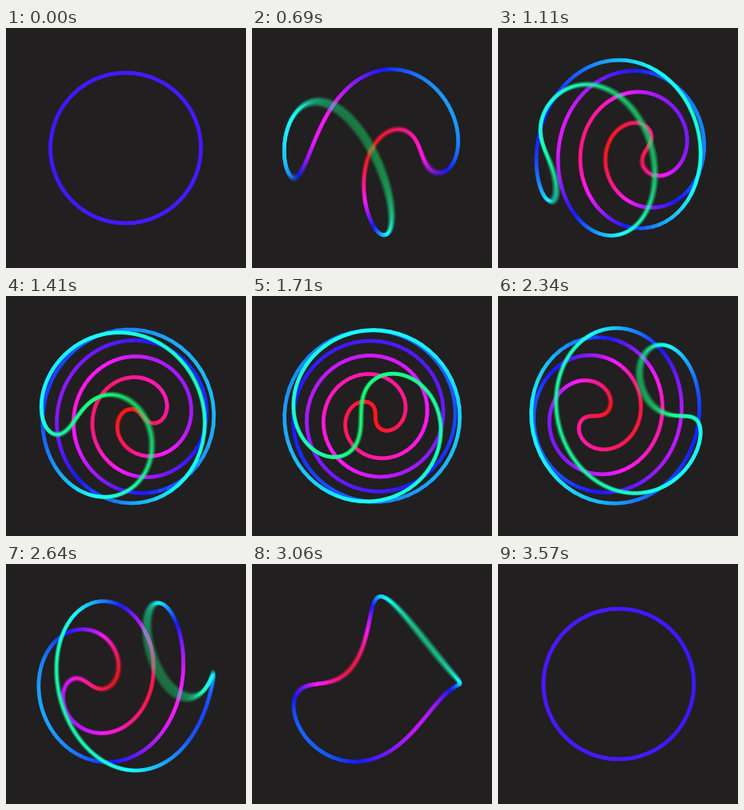
Animation, 300 px wide and 300 px high, one loop 3600 ms. Source, as an HTML page with a canvas:

```html
<!DOCTYPE html>
<html lang="en">
<head>
<meta charset="utf-8">
<title>Twisting ring</title>
<style>
  html, body { margin: 0; width: 100%; height: 100%; overflow: hidden; background: #221f20; }
  canvas { display: block; width: 300px; height: 300px; }
</style>
</head>
<body>
<canvas id="stage" width="300" height="300"></canvas>
<script>
const SIZE = 300, MID = SIZE / 2;
const STEP = 30, STEPS = 120;        // ms per step, steps per loop
const RADIUS = 94, CAMERA = 181;
const TWIST = 3 * Math.PI, POWER = 2.2;
const POINTS = 480, LINE = 4.7;
const SAMPLES = 10, SHUTTER = 0.7;   // motion blur

const stage = document.getElementById('stage').getContext('2d');
const layer = document.createElement('canvas');
layer.width = layer.height = SIZE;
const pen = layer.getContext('2d');
pen.lineWidth = LINE;
pen.lineCap = 'round';

const ease = p => p < 0.5
  ? 0.5 * (2 * p) ** POWER
  : 1 - 0.5 * (2 - 2 * p) ** POWER;

// A great circle twisted around its own axis, which turns half a revolution per loop.
function ringPoint(phi, turn, twist) {
  const along = Math.cos(phi), out = Math.sin(phi);
  const up = out * Math.cos(twist * along);
  const side = -out * Math.sin(twist * along);
  const c = Math.cos(turn), s = Math.sin(turn);
  const x = -along * c + side * s;
  const z = along * s + side * c;
  const scale = RADIUS * CAMERA / (CAMERA - RADIUS * z);
  return { x: MID + x * scale, y: MID - up * scale, z };
}

function drawRing(p) {
  const turn = Math.PI * p;
  const twist = TWIST * ease(1 - Math.abs(2 * p - 1));
  const points = Array.from({ length: POINTS }, (_, i) =>
    ringPoint(2 * Math.PI * i / POINTS, turn, twist));
  const parts = points.map((a, i) => {
    const b = points[(i + 1) % POINTS];
    return { a, b, z: (a.z + b.z) / 2 };
  }).sort((m, n) => m.z - n.z);

  pen.fillStyle = '#221f20';
  pen.fillRect(0, 0, SIZE, SIZE);
  for (const { a, b, z } of parts) {
    pen.strokeStyle = `hsl(${(252 - 108 * z).toFixed(1)}, 100%, 55%)`;
    pen.beginPath();
    pen.moveTo(a.x, a.y);
    pen.lineTo(b.x, b.y);
    pen.stroke();
  }
}

function drawStep(step) {
  for (let i = 0; i < SAMPLES; i++) {
    drawRing((step + SHUTTER * i / SAMPLES) / STEPS);
    stage.globalAlpha = 1 / (i + 1);   // running average
    stage.drawImage(layer, 0, 0);
  }
}

const start = performance.now();
let shown = -1;

function tick() {
  const step = Math.floor((performance.now() - start) / STEP) % STEPS;
  if (step !== shown) drawStep(shown = step);
  requestAnimationFrame(tick);
}
tick();
</script>
</body>
</html>
```
